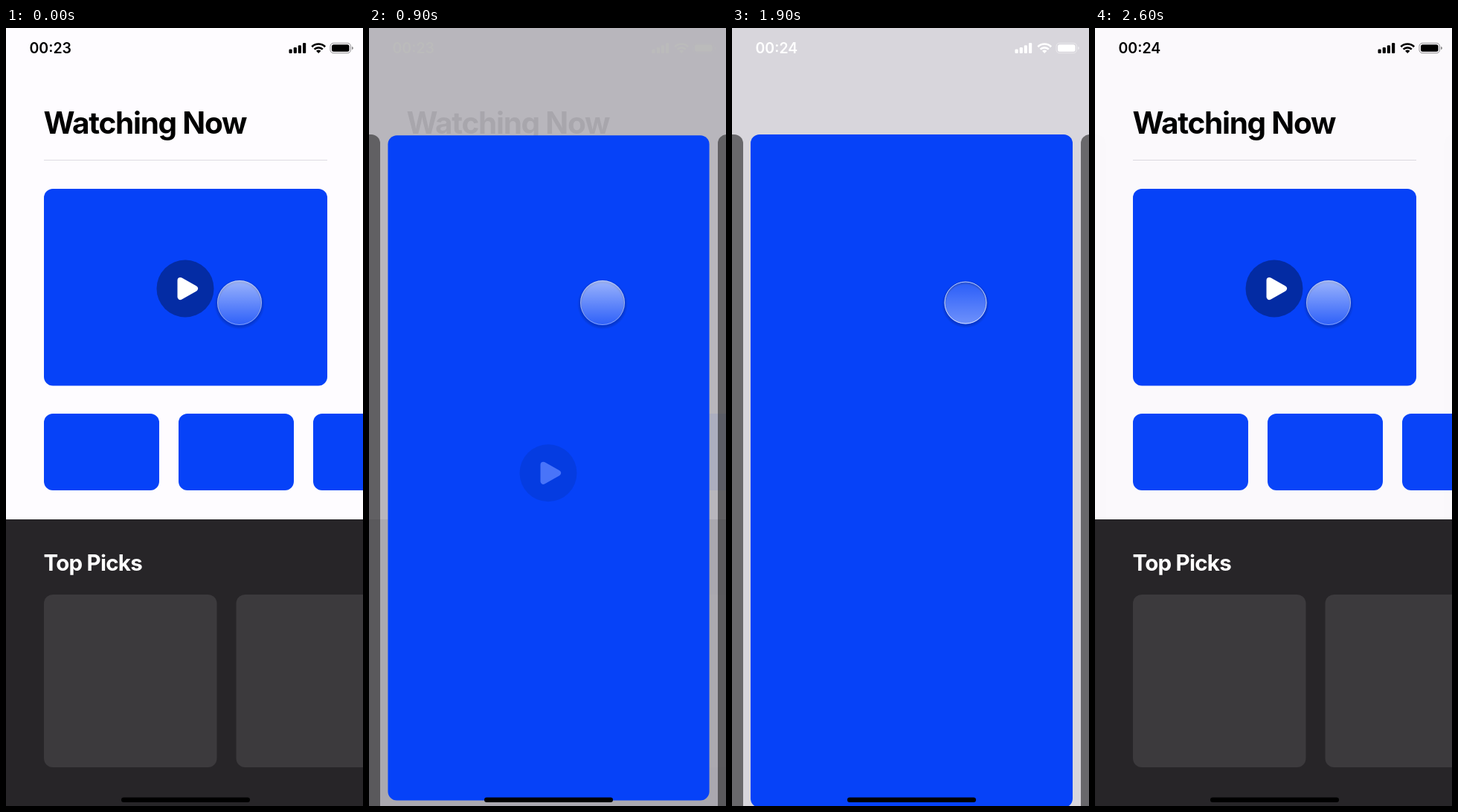
An HTML page for the animation above (2.7 s loop, 480x1045 px).

```html
<!DOCTYPE html>
<html lang="en">
<head>
<meta charset="utf-8">
<title>Card transition</title>
<style>
  html, body { margin: 0; width: 100%; height: 100%; overflow: hidden; background: #fefcff; }
  svg { display: block; width: 480px; height: 1045px; }
  text { font-family: Inter, sans-serif; font-optical-sizing: none; }
</style>
</head>
<body>
<svg viewBox="0 0 480 1045">
  <defs>
    <linearGradient id="glass" x1="0" y1="0" x2="0" y2="1">
      <stop id="glassTop" offset="0" stop-color="#fff"/>
      <stop id="glassEnd" offset="1" stop-color="#fff"/>
    </linearGradient>
    <radialGradient id="shade">
      <stop offset=".8" stop-color="#00124a" stop-opacity="0"/>
      <stop offset=".86" stop-color="#00124a" stop-opacity=".26"/>
      <stop offset="1" stop-color="#00124a" stop-opacity="0"/>
    </radialGradient>
  </defs>

  <rect width="480" height="1045" fill="#fefcff"/>
  <text x="50.5" y="142" font-size="40.5" font-weight="700" letter-spacing="-1.25">Watching Now</text>
  <path d="M51 177.5H432" stroke="#dddbe2"/>
  <rect y="660" width="480" height="385" fill="#272528"/>
  <g fill="#3c3a3d">
    <rect x="51" y="761" width="232.5" height="232" rx="12"/>
    <rect x="309.5" y="761" width="232.5" height="232" rx="12"/>
  </g>

  <rect id="veil" width="480" height="1045"/>
  <g id="thumbs" fill="#0642f8">
    <rect x="51" y="518" width="155" height="103" rx="12"/>
    <rect x="232" y="518" width="155" height="103" rx="12"/>
    <rect x="413" y="518" width="155" height="103" rx="12"/>
  </g>
  <text x="50.5" y="728.5" font-size="29.5" font-weight="700" letter-spacing="-.75" fill="#fff">Top Picks</text>
  <g id="sides">
    <rect x="-60" y="143" width="75" height="930" rx="12"/>
    <rect x="469" y="143" width="75" height="930" rx="12"/>
  </g>

  <g id="status">
    <text id="clock" x="31.5" y="34" font-size="19.5" font-weight="600">00:23</text>
    <rect x="380.5" y="28.5" width="4.2" height="5.5" rx="1.2"/>
    <rect x="386.7" y="26" width="4.2" height="8" rx="1.2"/>
    <rect x="392.8" y="23.2" width="4.2" height="10.8" rx="1.2"/>
    <rect x="399" y="20" width="4.2" height="14" rx="1.2"/>
    <g fill="none" stroke="currentColor" stroke-width="2.7">
      <path d="M411.3 25.2A12.6 12.6 0 0 1 429.1 25.2"/>
      <path d="M414.6 28.6A8 8 0 0 1 425.8 28.6"/>
    </g>
    <path d="M420.2 34L417 30.8A4.6 4.6 0 0 1 423.4 30.8Z"/>
    <rect x="436" y="20.3" width="27.5" height="13.4" rx="4.2" fill="none" stroke="currentColor" opacity=".42"/>
    <path d="M465 24.7Q467 25.4 467 27T465 29.3Z" opacity=".45"/>
    <rect x="438" y="22.3" width="23.5" height="9.4" rx="2.5"/>
  </g>

  <rect id="card" rx="12" fill="#0642f8"/>
  <g id="play">
    <circle cx="241" cy="350" r="38.5" opacity=".34"/>
    <path d="M234.5 339L254 350L234.5 361Z" fill="#fff" stroke="#fff" stroke-width="8" stroke-linejoin="round"/>
  </g>

  <g id="touch">
    <circle cy="2" r="34" fill="url(#shade)"/>
    <circle r="30" fill="url(#glass)"/>
    <circle id="ring" r="29.5" fill="none" stroke="#fff"/>
  </g>
  <rect x="155" y="1033.5" width="173" height="6.5" rx="3.25"/>
</svg>
<script>
const LOOP = 2700, STEP = 100;
const OPEN = 648, CLOSE = 1970, MINUTE = 1000;
const TAP_OPEN = 520, TAP_CLOSE = 1900;
const $ = id => document.getElementById(id);
const lerp = (a, b, k) => a + (b - a) * k;
const clamp = k => Math.min(1, Math.max(0, k));
const set = (id, attrs) => {
  for (const k in attrs) $(id).setAttribute(k, attrs[k]);
};

// Underdamped spring from 0 to 1; ms since its start
function spring(ms, freq, damp) {
  if (ms <= 0) return 0;
  const x = freq * ms / 1000, r = Math.sqrt(1 - damp * damp);
  return 1 - Math.exp(-damp * x) * (Math.cos(r * x) + damp / r * Math.sin(r * x));
}

// Exponential approach to 1 after OPEN and back to 0 after CLOSE
function fade(t, rise, fall) {
  if (t < OPEN) return 0;
  return t < CLOSE ? 1 - Math.exp((OPEN - t) / rise) : Math.exp((CLOSE - t) / fall);
}

// Finger pressure, ramping 100 ms in and out around the middle of a tap
const press = (t, mid) => clamp((165 - Math.abs(t - mid)) / 100);

function draw(t) {
  const p = spring(t - OPEN, 15.1, .8) - spring(t - CLOSE, 18.4, .67);
  const x = lerp(51, 25, p), y = lerp(216, 143, p);
  set('card', { x, y, width: lerp(432, 458, p) - x, height: lerp(480.5, 1047, p) - y });

  const veil = fade(t, 92, 150), tone = lerp(90, 216, fade(t, 200, 150));
  set('veil', { fill: `rgb(${tone},${tone - 2},${tone + 4})`, opacity: veil });
  set('thumbs', { opacity: 1 - veil });
  set('sides', { opacity: .515 * veil ** 1.2 });

  const slow = fade(t, 190, 100), ink = 255 * slow, color = `rgb(${ink},${ink},${ink})`;
  set('play', { transform: `translate(0 ${252 * p})`, opacity: 1 - slow });
  set('status', { fill: color, color });
  $('clock').textContent = t < MINUTE ? '00:23' : '00:24';

  const q = press(t, TAP_OPEN) + press(t, TAP_CLOSE);
  set('touch', { transform: `translate(314 369) scale(${lerp(1, .95, q)})` });
  set('glassTop', { 'stop-opacity': lerp(.6, .14, q) });
  set('glassEnd', { 'stop-opacity': lerp(.16, .42, q) });
  set('ring', { 'stroke-opacity': lerp(.4, .75, q) });
}

function tick() {
  draw(Math.floor(performance.now() % LOOP / STEP) * STEP);
  requestAnimationFrame(tick);
}
tick();
</script>
</body>
</html>
```
